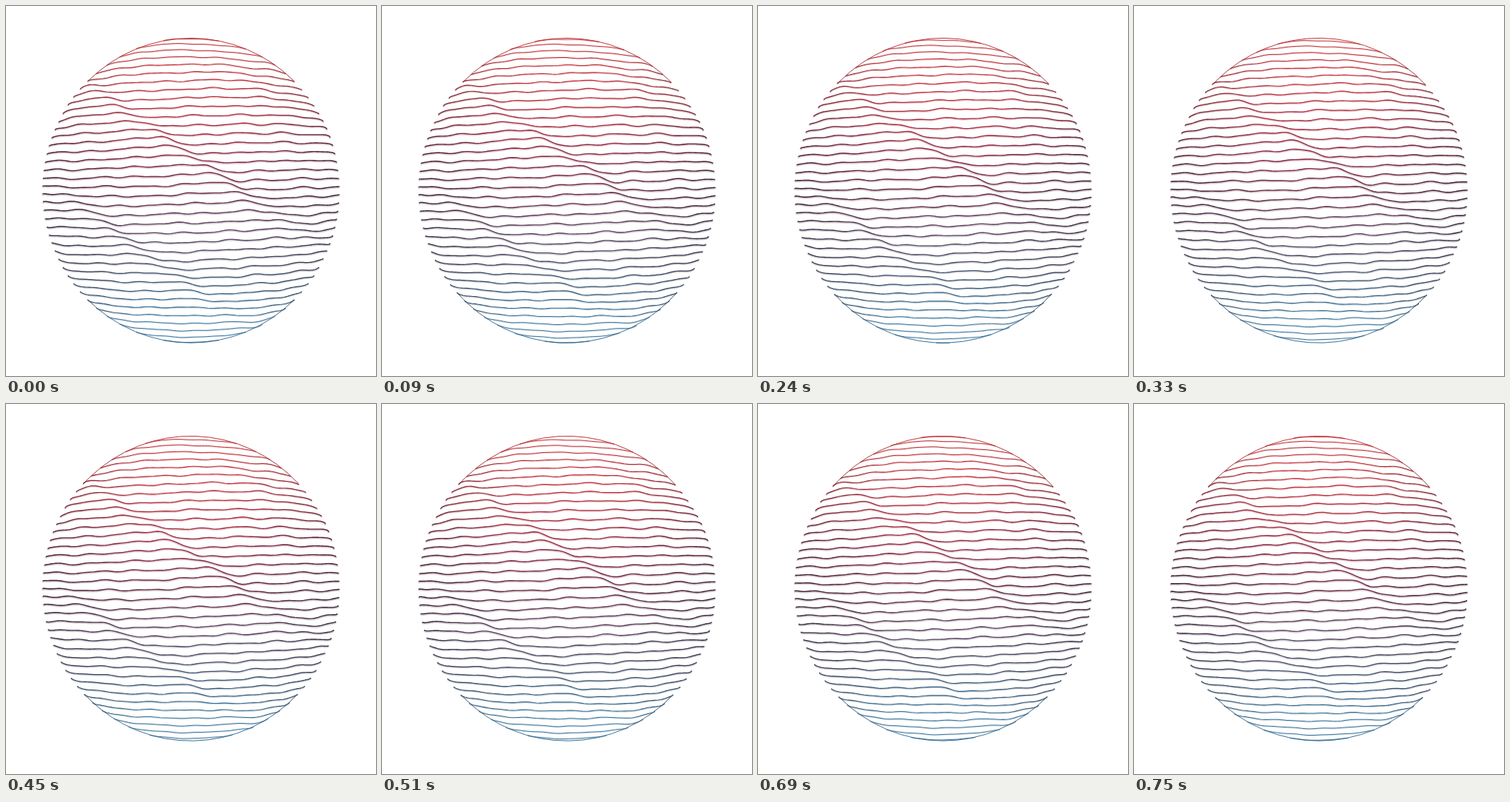
These frames come from a looping animation (500 by 500 pixels, 780 ms). An HTML page with a canvas:

```html
<!DOCTYPE html>
<html lang="en">
<head>
<meta charset="utf-8">
<title>Rippled sphere</title>
<style>
  html, body { margin: 0; width: 100%; height: 100%; overflow: hidden; background: #fff; }
  canvas { display: block; }
</style>
</head>
<body>
<canvas id="stage" width="500" height="500"></canvas>
<script>
const ctx = document.getElementById('stage').getContext('2d');
const { PI, sin, cos, acos, asin, sqrt, exp, tanh, floor } = Math;

const LOOP = 780, STEP = 30;
const CX = 250, CY = 249.3, RX = 200, RY = 206;
const EYE = 8;                        // camera distance in sphere radii
const ZOOM = sqrt(EYE * EYE - 1);
const GAP = 0.0527;                   // distance between slices
const RIM_FROM = 0.66;                // slices beyond this merge into the outline

function gradient(g, stops) {
  stops.forEach(([at, color]) => g.addColorStop(at, color));
  return g;
}

const ink = gradient(ctx.createLinearGradient(0, 43, 0, 456), [
  [0, '#b81a20'], [0.12, '#c02830'], [0.25, '#ac283a'], [0.4, '#852a45'],
  [0.52, '#652c46'], [0.63, '#5f4562'], [0.73, '#474862'],
  [0.83, '#315878'], [0.92, '#37749c'], [1, '#1f5c88']
]);

const shade = gradient(ctx.createLinearGradient(CX - RX, 0, CX + RX, 0), [
  [0, 'rgba(22,14,30,.6)'], [0.12, 'rgba(22,14,30,.35)'], [0.35, 'rgba(22,14,30,0)'],
  [0.65, 'rgba(22,14,30,0)'], [0.88, 'rgba(22,14,30,.35)'], [1, 'rgba(22,14,30,.6)']
]);

const bell = (v, mid, width) => exp(-(((v - mid) / width) ** 2));

// A crease lifts the line on its left and drops it on its right.
const crease = (s, width) => tanh(s / width) * exp(-((s / (s < 0 ? 75 : 100)) ** 2));

// Standing relief that the slices slide through.
function relief(x, y) {
  const upper = 6 * crease(x - 146 - (y - 126) * 1.42, 14) * bell(y, 205, 115);
  const lower = 5 * crease(x - 93 - (y - 260) * 1.33, 15) * bell(y, 335, 95);
  const corner = 3 * crease(x - 262 - (y - 55) * 1.7, 22) * bell(y, 110, 80);
  const ripple = 0.8 * sin(x / 8.5 - y / 13 + 1.5 * sin(y / 31))
    + 0.7 * sin(x / 14 + y / 19 + 2 * sin(x / 57))
    + 0.5 * sin(x / 5.3 - y / 23 + 2 * sin(y / 17));
  return upper + lower + corner + ripple;
}

function slicePath(h, r) {
  const path = new Path2D();
  const reach = acos(1 / (EYE * r));
  const count = Math.max(24, Math.ceil(r * 130));
  for (let i = 0; i <= count; i++) {
    const side = 2 * i / count - 1;
    const a = reach * side;
    const scale = ZOOM / (EYE - r * cos(a));
    const x = CX + RX * r * sin(a) * scale;
    const y = CY + RY * h * scale;
    path.lineTo(x, y + relief(x, y) * r * (1 - 0.6 * side ** 8));
  }
  return path;
}

function drawSlice(h) {
  const r = sqrt(1 - h * h);
  if (!(r > 1 / EYE)) return;
  const path = slicePath(h, r);
  ctx.save();
  ctx.translate(0, 0.8);
  ctx.globalAlpha = 0.22;
  ctx.lineWidth = 0.8 + 2.4 * r * r;
  ctx.stroke(path);
  ctx.restore();
  ctx.lineWidth = 0.8 + 0.6 * r * r;
  ctx.stroke(path);
}

// Outline of the cap above (or below) the slice at height h.
function drawRim(h) {
  const a = asin(h * EYE / ZOOM);
  ctx.lineWidth = 0.9;
  ctx.beginPath();
  ctx.ellipse(CX, CY, RX, RY, 0, a, PI - a, h < 0);
  ctx.stroke();
}

function draw() {
  const phase = floor(performance.now() % LOOP / STEP) * STEP / LOOP;
  const heights = Array.from({ length: 42 }, (_, i) => (i - 20.5 + phase) * GAP);
  ctx.clearRect(0, 0, 500, 500);
  ctx.strokeStyle = ink;
  ctx.lineCap = ctx.lineJoin = 'round';
  heights.forEach(drawSlice);
  drawRim(heights.findLast(h => h < -RIM_FROM));
  drawRim(heights.find(h => h > RIM_FROM));

  ctx.globalCompositeOperation = 'source-atop';
  ctx.fillStyle = shade;
  ctx.fillRect(0, 0, 500, 500);
  ctx.globalCompositeOperation = 'source-over';
  requestAnimationFrame(draw);
}
draw();
</script>
</body>
</html>
```
